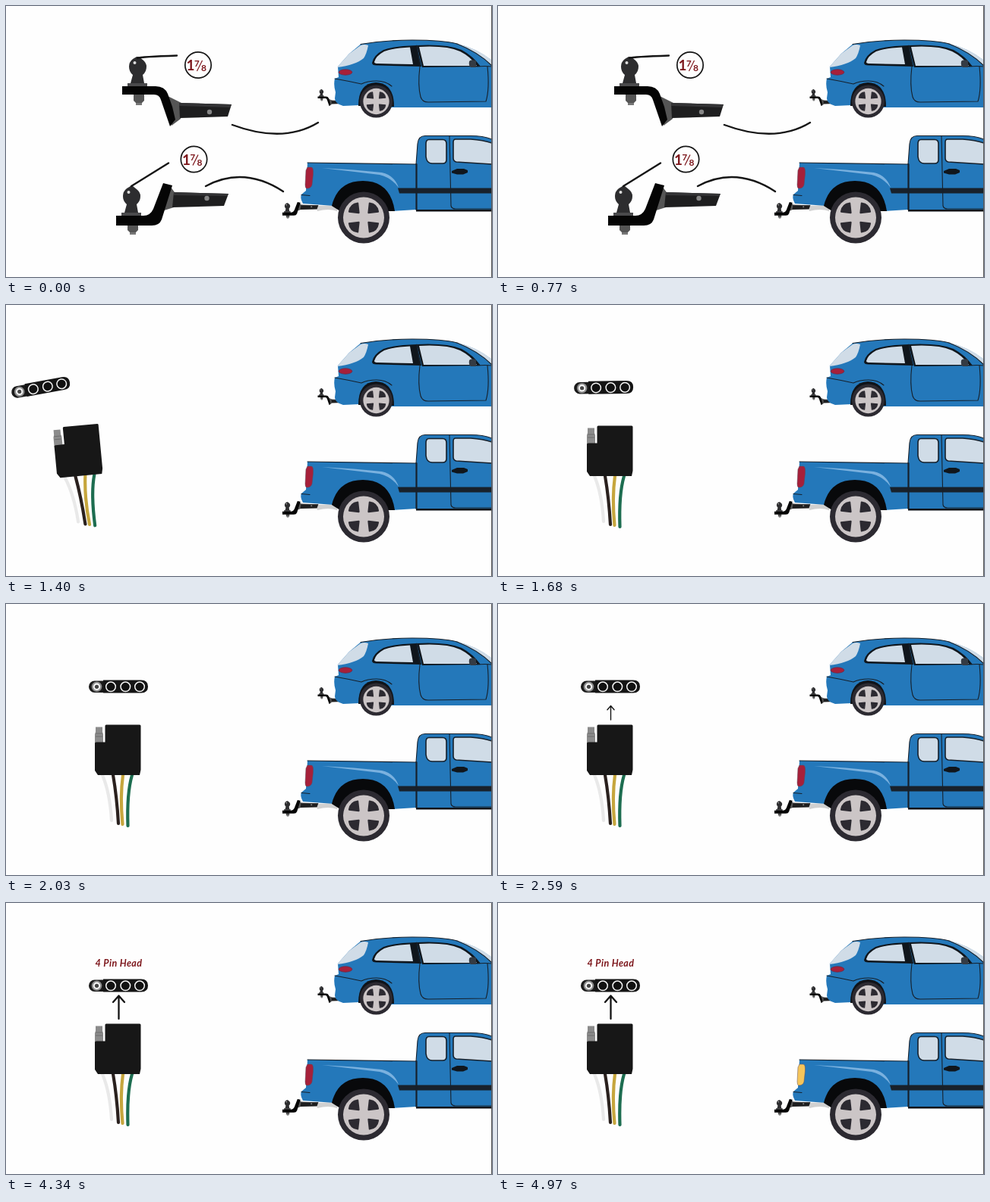
Recreate the animation shown at these times as an HTML page. Size 640 by 358 pixels, loop 5.04 s.

```html
<!DOCTYPE html>
<html lang="en">
<head>
<meta charset="utf-8">
<title>Trailer wiring</title>
<style>
html, body { margin: 0; width: 100%; height: 100%; overflow: hidden; background: #fefefe; }
svg { display: block; width: 100vw; height: 100vh; }
text { font-family: Lato, "Open Sans", sans-serif; font-weight: 700; fill: #7d171c; }
.blue { fill: #2478ba; }
.glass { fill: #d0dce7; }
.line { fill: none; stroke: #16202b; stroke-width: 1.1; stroke-linecap: round; stroke-linejoin: round; }
.thick { stroke-width: 2.2; }
.lead { fill: none; stroke: #161616; stroke-width: 2.4; stroke-linecap: round; }
.wire { fill: none; stroke-width: 4.2; stroke-linecap: round; }
.hole { fill: #111; stroke: #f4f4f4; stroke-width: 1.5; }
</style>
</head>
<body>
<svg viewBox="0 0 640 358" preserveAspectRatio="none">
  <defs>
    <g id="ball">
      <path d="M168 116H182V125L179 128H171L168 125Z" fill="#555"/>
      <path d="M171 128H179V131H171Z" fill="#777"/>
      <path d="M172 67H175L180 71Q185 75 185 80Q185 87 180 91L182 102H186V107H160V102H164L167 91Q162 87 162 80Q162 74 167 70Z" fill="#2d2d2f"/>
      <path d="M160 102H186V106H160Z" fill="#4a4a4c"/>
      <circle cx="169.5" cy="75" r="2" fill="#ddd"/>
    </g>
    <g id="drop">
      <use href="#ball"/>
      <path d="M213 119L231 128L230 149L218 158Z" fill="#555"/>
      <path d="M228 128L297 130L292 146L229 148Z" fill="#1e1e1f"/>
      <path d="M228 128L297 130L295 134L228 132Z" fill="#343436"/>
      <circle cx="268" cy="140" r="3.2" fill="#858585"/>
      <path d="M153 106H197Q209 106 213 116L219 133L223 150L216 159L204 124Q202 117 195 117H153Z" fill="#050505"/>
    </g>
    <g id="rise">
      <use href="#ball" x="-8" y="171"/>
      <path d="M216 238L222 246L221 266L205 271Z" fill="#555"/>
      <path d="M221 246L293 248L287 264L219 266Z" fill="#1e1e1f"/>
      <path d="M221 246L293 248L291 251L221 250Z" fill="#343436"/>
      <circle cx="264.5" cy="254" r="3.2" fill="#858585"/>
      <path d="M145 277H181Q190 277 194 268L207 234L219 237L205 282Q202 290 192 290H145Z" fill="#050505"/>
    </g>
    <path id="gap" d="M0 -9L-8 -19Q0 -25 8 -19Z" fill="#2c2a31" stroke="#2c2a31" stroke-width="2" stroke-linejoin="round"/>
    <g id="wheel">
      <circle r="34" fill="#2c2a31"/>
      <circle r="27" fill="#cbc5c6"/>
      <use href="#gap" transform="rotate(45)"/>
      <use href="#gap" transform="rotate(135)"/>
      <use href="#gap" transform="rotate(225)"/>
      <use href="#gap" transform="rotate(315)"/>
    </g>
    <g id="size">
      <circle r="17.2" fill="#fefefe" stroke="#161616" stroke-width="1.7"/>
      <text x="-15.5" y="7" font-size="19">1</text>
      <text x="-5" y="1.5" font-size="11.5">7</text>
      <text x="4" y="8" font-size="12">8</text>
      <path d="M-1.5 8L5.500 -6" stroke="#7d171c" stroke-width="1.2"/>
    </g>
  </defs>

  <g id="car">
    <use href="#drop" transform="translate(373.8 94) scale(.24)"/>
    <path class="blue" d="M437 80L452 63L467 50.500Q500 45 535 45Q575 45 594 50Q618 55 640 72V134H508L466 131L444 132Q433 129 433 122L434 114Q431 104 433 96L438 94Z"/>
    <path class="line" d="M467 50.500Q500 45 535 45Q575 45 594 50"/>
    <path class="glass" d="M436 81L452 63L467 52Q472 50 477 52Q475 63 471 69Q460 78 436 81Z"/>
    <path class="glass" d="M594 50Q620 55 640 72V79Q622 61 594 50Z"/>
    <path class="line" d="M594 50Q622 61 640 79"/>
    <path d="M482 75Q484 65 497 58Q510 53 541 52L547 80L490 78.500Q482 79 482 75Z" fill="#10161c"/>
    <path class="glass" d="M485 74Q487 66 498 60Q510 55.500 532 54.500L536 77L490 76Q485 76 485 74Z"/>
    <path d="M541 52Q580 50 600 58Q615 66 625 80L548 81Z" fill="#10161c"/>
    <path class="glass" d="M544 54Q580 52 598 60Q612 67 620 79L550 79Z"/>
    <path d="M610 73Q612 70 619 72V81H612Q609 79 610 73Z" fill="#343b44"/>
    <path class="line" d="M541 52L545 80Q542 105 546 120Q548 127 556 127L632 126Q637 110 634 80"/>
    <path class="line" d="M433 96Q450 99 468 103Q476 99 488 99Q500 99 508 106M620 80Q631 79 640 80"/>
    <ellipse cx="447" cy="87.500" rx="8.800" ry="3.700" fill="#a6203a" stroke="#6d2440" stroke-width=".7"/>
    <path d="M464 132Q464 102 487 101Q511 102 511 133Z" fill="#101318"/>
    <use href="#wheel" transform="translate(487.5 126) scale(.635)"/>
  </g>

  <g id="truck">
    <path d="M408 264L436 263V271Q425 267 410 271Z" fill="#d0d0d0"/>
    <use href="#rise" transform="translate(317.6 184) scale(.32)"/>
    <path d="M540 266H640V271.500H540Z" fill="#101318"/>
    <path class="blue" d="M397 207L540 209L542 182Q543 171.500 552 171.500H612Q628 171.500 640 176V269H540L508 271L432 264L391 261Q387 254 389 249L395 244Z"/>
    <path d="M429 264Q437 231 470 231Q506 231 512 271H440Z" fill="#08090b"/>
    <path d="M416 214Q460 216 495 220Q512 224 517 240Q508 227 492 223Q460 219 416 214Z" fill="#7ab1df"/>
    <path d="M516 240.500H640V247.500H518Z" fill="#18212b"/>
    <path class="line" d="M397 207L540 209L542 182Q543 171.500 552 171.500H612Q628 171.500 640 176"/>
    <path class="line thick" d="M540.500 209V269"/>
    <path class="line" d="M584 172L586 264Q587 268 592 268H640M389 249.500L400 250.500"/>
    <path class="glass" d="M557 176.500H575Q580 176.500 580 182V203Q580 208 575 208H561Q554 208 553 199V182Q553 176.500 557 176.500Z" stroke="#16202b" stroke-width="1.6"/>
    <path class="glass" d="M592 176H612Q628 177 640 181V209L593 206Q589 205 589 201V180Q589 176 592 176Z" stroke="#16202b" stroke-width="1.6"/>
    <path d="M587 218L594 215H603L608 217V220L602 222.500H594L587 220.500Z" fill="#10161c"/>
    <path id="lamp" d="M397 213H402Q405 213 404.500 222L403 236Q402 241 396 241Q394 241 394 236L395 217Z" stroke="#5d4b5c" stroke-width=".5"/>
    <use href="#wheel" x="471" y="279.500"/>
  </g>

  <g id="hitches">
    <use href="#drop"/>
    <use href="#rise"/>
    <path class="lead" d="M173 69Q178 67 225 65.500M165 238L214 207.500M298 157Q365 182 411 154M263 238Q313 211 365 245"/>
    <use href="#size" x="253" y="78"/>
    <use href="#size" x="247.5" y="202.5"/>
  </g>

  <g id="head">
    <rect x="109" y="101.500" width="30" height="15.500" rx="7.700" fill="#1a1a1a"/>
    <path d="M128 100.500H178Q187 100.500 187 109T178 117.500H128Z" fill="#151515"/>
    <circle cx="119.500" cy="109.300" r="6.800" fill="#8c8c8c"/>
    <circle cx="119.500" cy="109.300" r="4.700" fill="#f4f4f4"/>
    <circle cx="119.500" cy="109.300" r="2.600" fill="#444"/>
    <circle class="hole" cx="138" cy="109.300" r="6.300"/>
    <circle class="hole" cx="157.300" cy="109.300" r="6.300"/>
    <circle class="hole" cx="176" cy="109.300" r="6.300"/>
  </g>

  <g id="plug">
    <path class="wire" stroke="#e9e9e9" d="M127 226Q137 250 139 286"/>
    <path class="wire" stroke="#2a211e" d="M141 226Q146 255 148 290"/>
    <path class="wire" stroke="#c6a63d" d="M154 226Q150 255 153.500 291"/>
    <path class="wire" stroke="#1d6d50" d="M166 226Q159 250 160.500 293"/>
    <path d="M118 162.500H127V169L128 172V185H117V172L118 169Z" fill="#8b8b8b"/>
    <path d="M118 171H127M118 175H127" stroke="#6d6d6d"/>
    <path d="M132 159.500H176Q177.500 159.500 177.500 161V219L176 226H121L117 220V184Q117 182.500 119 182.500H130.500V161Q130.500 159.500 132 159.500Z" fill="#171717"/>
  </g>

  <path id="arrow" d="M148.500 153V123M141 131L148.500 122.500L156 131" fill="none" stroke="#131313" stroke-width="2.3" stroke-linecap="round" stroke-linejoin="round"/>
  <text id="label" x="117.5" y="83.500" font-size="12.5" font-style="italic" letter-spacing=".4">4 Pin Head</text>
  <path d="M639.500 0V358" stroke="#555"/>
</svg>
<script>
const LOOP = 5040;
const el = id => document.getElementById(id);
const [hitches, head, plug, arrow, label, lamp] =
  ["hitches", "head", "plug", "arrow", "label", "lamp"].map(el);

const ramp = (t, from, to) => Math.min(1, Math.max(0, (t - from) / (to - from)));
const left = (t, from, to) => (1 - ramp(t, from, to)) ** 2;

// Slides a part in from the left while it swings upright.
function slide(part, k, dist, turn, cx, cy) {
  part.setAttribute("transform", `translate(${-dist * k} 0) rotate(${-turn * k} ${cx} ${cy})`);
  part.style.visibility = k < 1 ? "visible" : "hidden";
}

function draw(t) {
  hitches.style.opacity = 1 - ramp(t, 860, 1110);
  slide(head, left(t, 1250, 1798), 195, 20, 148, 109);
  slide(plug, left(t, 1200, 1680), 156, 16, 147, 193);

  const grow = 1 - left(t, 2450, 2830);
  arrow.setAttribute("transform", `translate(148.5 153) scale(${grow}) translate(-148.5 -153)`);
  arrow.style.visibility = grow > 0 ? "visible" : "hidden";

  label.style.opacity = ramp(t, 2870, 3150);
  lamp.setAttribute("fill", t < 4480 ? "#a6203a" : "#f5c55b");
}

const start = performance.now();
function tick() {
  draw((performance.now() - start) % LOOP);
  requestAnimationFrame(tick);
}
tick();
</script>
</body>
</html>
```
